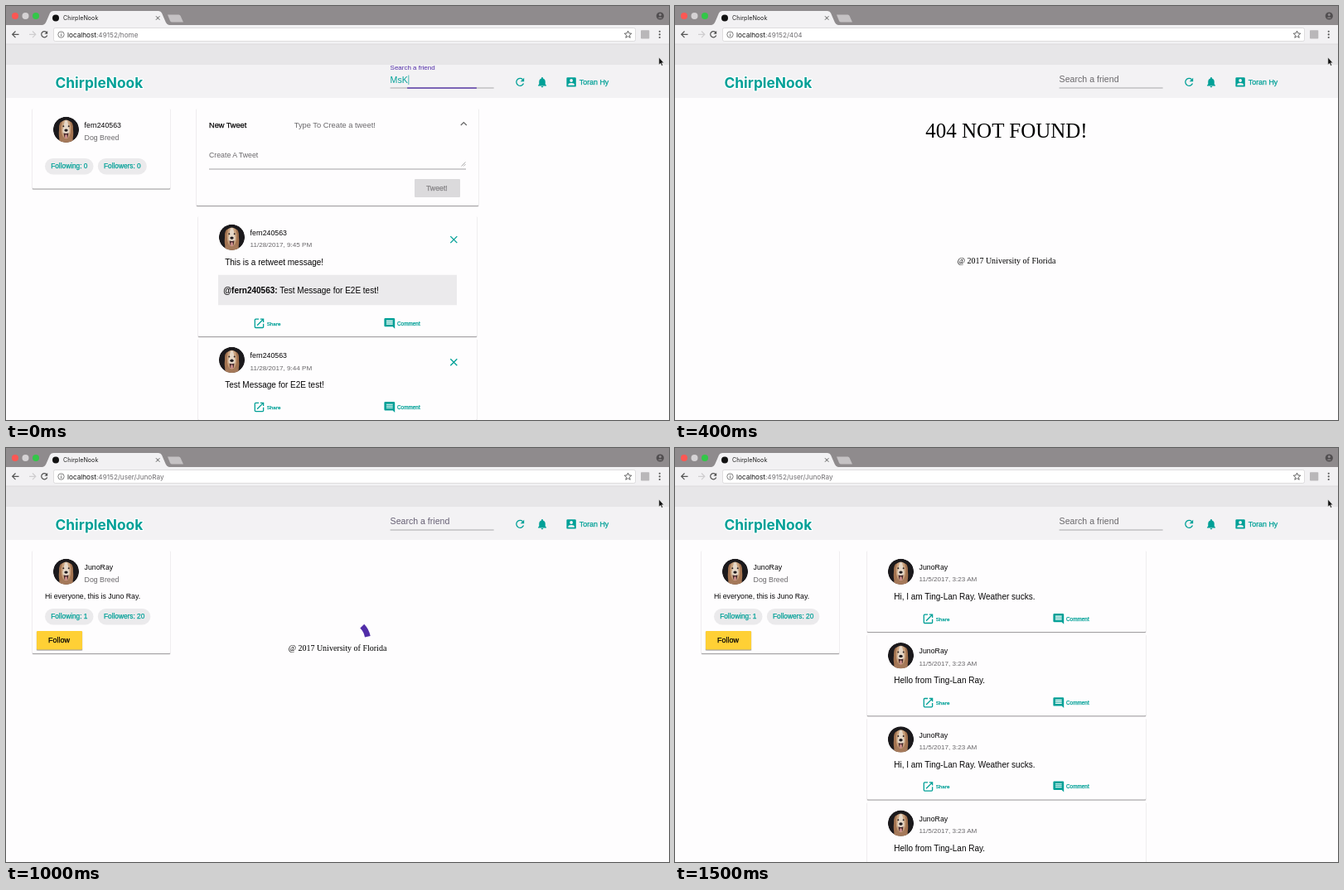
Animation of 800x500 px, one loop 1600 ms. Source, as an HTML page:

```html
<!DOCTYPE html>
<html lang="en">
<head>
<meta charset="utf-8">
<title>ChirpleNook</title>
<style>
html, body { margin: 0; width: 100%; height: 100%; overflow: hidden; background: #fefdfe; }
svg { display: block; width: 800px; height: 500px; }
text { font-family: "Liberation Sans", Arial, sans-serif; white-space: pre; }
.ui { font-family: Inter, Roboto, sans-serif; }
.serif { font-family: "Liberation Serif", Times, serif; }
.medium { stroke: currentColor; stroke-width: .25px; }
.line { fill: none; stroke-width: 1.3px; }
</style>
</head>
<body>
<svg viewBox="0 0 800 500" xmlns="http://www.w3.org/2000/svg">
  <defs>
    <clipPath id="face"><circle r="15.6"/></clipPath>
    <clipPath id="below"><rect y="71" width="800" height="429"/></clipPath>
    <g id="dog" clip-path="url(#face)">
      <circle r="15.6" fill="#1b191c"/>
      <path d="M-8 17Q-9 8 -6 4H6Q9 8 8 17Z" fill="#a5795a"/>
      <path d="M-4.500 -10Q-9 -9 -8.500 0Q-9.500 9 -7 12L-4 6ZM4.500 -10Q9 -9 8.500 0Q9.500 9 7 12L4 6Z" fill="#a37350"/>
      <path d="M-4.500 -10Q0 -13.500 4.500 -10Q6.500 -4 5.500 3Q4 11 0 11Q-4 11 -5.500 3Q-6.500 -4 -4.500 -10Z" fill="#c9a27e"/>
      <path d="M-1.500 -11H1.500L4 0Q4.500 6 0 7Q-4.500 6 -4 0Z" fill="#e6d8c8"/>
      <circle cx="-3.200" cy="-4" r="1" fill="#2b2324"/>
      <circle cx="3.200" cy="-4" r="1" fill="#2b2324"/>
      <ellipse cy=".8" rx="2.200" ry="1.700" fill="#211c1f"/>
      <path d="M-3 4Q0 5.500 3 4L2 9.500H-2Z" fill="#47292c"/>
      <ellipse cy="8.300" rx="1.500" ry="2.600" fill="#cc8d8b"/>
    </g>
    <g id="share" class="line" stroke="#00a097">
      <path d="M-.5 -5.1H-4.2Q-5.2 -5.1 -5.2 -4.1V4.2Q-5.2 5.2 -4.2 5.2H4.1Q5.1 5.2 5.1 4.2V.4M1.4 -5.1H5.1V-1.4M5 -5L-2.4 2.4"/>
    </g>
    <g id="comment">
      <path d="M-5.2 -6.3H5.2Q6.4 -6.3 6.4 -5.1V6.5L3.9 4H-5.2Q-6.4 4 -6.4 2.8V-5.1Q-6.4 -6.3 -5.2 -6.3Z" fill="#00a097"/>
      <path d="M-3.9 -3.2H3.9M-3.9 -1.2H3.9M-3.9 .8H3.9" stroke="#fff" stroke-width="1.1"/>
    </g>
  </defs>
  <rect width="800" height="500" fill="#fefdfe"/>
  <g id="page"></g>
  <g id="header"></g>
  <g id="chrome"></g>
  <g id="address"></g>
</svg>
<script>
const TEAL = '#00a097', PURPLE = '#512da8', INK = '#060506', GREY = '#6a686b';
const SITE = 'ChirpleNook', ME = 'fern240563', FRIEND = 'JunoRay';
const STEP = 100, LOOP = 1600;
const $ = id => document.getElementById(id);

const text = (x, y, size, str, fill = INK, extra = '') =>
  `<text x="${x}" y="${y}" font-size="${size}" fill="${fill}" ${extra}>${str}</text>`;
const medium = (x, y, size, str, fill) =>
  text(x, y, size, str, fill, `class="medium" color="${fill}"`);
const centered = (y, size, str) =>
  text(400, y, size, str, '#000', 'class="serif" text-anchor="middle"');
const rect = (x, y, w, h, fill, rx = 0) =>
  `<rect x="${x}" y="${y}" width="${w}" height="${h}" rx="${rx}" fill="${fill}"/>`;
// faint sides, a firm lower edge and no upper edge
const card = (x, y, w, h, fill = '#fefdfe') =>
  rect(x - .6, y + .5, w + 1.2, h + 1, '#e4e2e4', 1) +
  rect(x, y + h - 2, w, 3, '#a3a1a3', 1) + rect(x, y, w, h, fill, 1);
const circle = (x, y, r, fill) => `<circle cx="${x}" cy="${y}" r="${r}" fill="${fill}"/>`;
const stroke = (d, color, width = 1.2) =>
  `<path d="${d}" fill="none" stroke="${color}" stroke-width="${width}"/>`;
const use = (id, x, y) => `<use href="#${id}" x="${x}" y="${y}"/>`;
const mix = (a, b, k) => a + (b - a) * k;
const blend = (a, b, k) => `rgb(${a.map((v, i) => Math.round(mix(v, b[i], k)))})`;

function drawChrome() {
  return rect(0, 0, 800, 23, '#8f8b8d') +
    circle(11, 12, 4, '#fc5753') + circle(23.5, 12, 4, '#d5d2d4') + circle(36, 12, 4, '#33c748') +
    '<path d="M44 23Q47 22.5 48.5 19L53 8.5Q54 6 57 6H184Q187 6 188 8.5L192.500 19Q194 22.500 197 23Z" fill="#f2f1f3"/>' +
    circle(60, 14.5, 4, '#111') +
    text(69, 17.2, 7.2, SITE, '#222', 'class="ui"') +
    stroke('M181 12.3L185.400 16.700M185.400 12.300L181 16.700', '#555', 1) +
    '<path d="M195 10.500H208.500Q210 10.500 210.600 12L214 19.500H200.500Q198.700 19.500 198 18Z" fill="#c5c2c4"/>' +
    circle(789.3, 12, 4.6, '#514e50') + circle(789.3, 10.6, 1.5, '#8f8b8d') +
    '<path d="M786.300 14.800Q789.300 11.800 792.300 14.800Z" fill="#8f8b8d"/>' +
    rect(0, 23, 800, 23, '#f2f1f3') +
    '<rect x="57.500" y="26.500" width="702" height="16" rx="2" fill="#fff" stroke="#d3d1d3" stroke-width=".7"/>' +
    stroke('M15.500 34.300H8M11.500 30.500L7.700 34.300L11.500 38.100', '#555') +
    stroke('M28 34.300H35.500M32 30.500L35.800 34.300L32 38.100', '#cfcdcf') +
    stroke('M49.300 32.200A3.600 3.600 0 1 0 49.700 35.500', '#555') +
    '<path d="M50.200 30V33.700H46.500Z" fill="#555"/>' +
    '<circle cx="66.500" cy="34.500" r="3.700" fill="none" stroke="#666" stroke-width=".8"/>' +
    rect(66.1, 34, .9, 2.6, '#666') + rect(66.1, 32.3, .9, .9, '#666') +
    '<path d="M750.500 30L751.700 32.900L754.800 33.200L752.400 35.200L753.200 38.300L750.500 36.600L747.800 38.300L748.600 35.200L746.200 33.200L749.300 32.900Z" fill="none" stroke="#555" stroke-width=".9"/>' +
    rect(766, 29.3, 10.3, 10.3, '#b9b7b9', .8) +
    [30.8, 34.4, 38].map(y => circle(788.7, y, 1.05, '#555')).join('') +
    rect(0, 46, 800, 25, '#e7e6e8') + rect(0, 45.7, 800, .6, '#d0ced0') +
    '<path d="M787.800 62V71L789.800 69.200L791.200 72.200L792.600 71.500L791.300 68.700H793.800Z" fill="#111" stroke="#fff" stroke-width=".5"/>';
}

function drawAddress(path) {
  return text(74, 37.5, 8.2, `localhost<tspan fill="#6f6d70">:49152/${path}</tspan>`, '#111', 'class="ui"');
}

// down: 0 = label floats above the field, 1 = label rests in it
function drawHeader({ down = 1, typed = '', ripple = 0 }) {
  const size = mix(7.97, 10.625, down);
  const tone = Math.max(0, (down - .9) / .1);
  let out = rect(0, 71, 800, 40, '#f3f2f4') +
    text(59.5, 99.3, 17.3, SITE, TEAL,
      'class="ui" font-weight="700" stroke="#fff" stroke-width="2.500" stroke-linejoin="round" paint-order="stroke"') +
    '<g clip-path="url(#below)">' +
    text(463.6, mix(76.6, 92.4, down), size, 'Search a friend',
      blend([81, 45, 168], [106, 104, 107], tone)) + '</g>' +
    rect(463.6, 98.6, 125, .8, '#959396');
  if (typed) out += text(463.6, 92.8, 10.625, typed, TEAL, 'id="typed"');
  if (ripple) out += rect(526 - 62.5 * ripple, 98.4, 125 * ripple, 1.3, PURPLE);
  return out +
    stroke('M623.500 88.600A4.500 4.500 0 1 0 624.500 93.500', TEAL, 1.3) +
    `<path d="M625.200 86.800V91.300H620.700Z" fill="${TEAL}"/>` +
    `<path transform="translate(639.500 84.500) scale(.625)" fill="${TEAL}" d="M12 22c1.100 0 2-.9 2-2h-4c0 1.100.89 2 2 2zm6-6v-5c0-3.070-1.640-5.640-4.500-6.320V4c0-.83-.67-1.500-1.500-1.500s-1.500.67-1.500 1.500v.68C7.630 5.360 6 7.920 6 11v5l-2 2v1h16v-1l-2-2z"/>` +
    rect(676.4, 86.2, 11.4, 11.4, TEAL, 1.2) + circle(682.1, 90, 1.9, '#f3f2f4') +
    '<path d="M678.300 95.700V95.100Q678.300 93.100 682.100 93.100T685.900 95.100V95.700Z" fill="#f3f2f4"/>' +
    medium(691.8, 95.1, 8.9, 'Toran Hy', TEAL);
}

function profile(name, following, followers, bio) {
  const dy = bio ? 10 : 0;
  const chip = (x, w, str) => rect(x, 184 + dy, w, 19.4, '#ebeaec', 9.7) +
    medium(x + 7.2, 196.4 + dy, 8.3, str, TEAL);
  let out = card(32, 124, 166, bio ? 124 : 96.5) + use('dog', 72.5, 149.3) +
    text(94.6, 147, 8.75, name) + text(94.6, 161.8, 8.75, 'Dog Breed', GREY) +
    chip(47, 58.5, 'Following: ' + following) +
    chip(110.8, followers > 9 ? 63.5 : 59, 'Followers: ' + followers);
  if (bio) {
    out += text(47, 182, 8.75, bio) +
      card(37, 221, 55, 22.5, '#ffd035') + medium(51, 235.2, 9, 'Follow', INK);
  }
  return out;
}

// a: vertical centre of the avatar
function post(a, name, date, msg, { quote = '', own = false } = {}) {
  const dy = quote ? 47 : 0, foot = a + 57 + dy;
  let out = card(232, a - 25.3, 336, 98 + dy) + use('dog', 272.5, a) +
    text(294.6, a - 2.2, 8.75, name) + text(294.6, a + 12.1, 8.125, date, GREY) +
    text(264.2, a + 33.7, 10, msg);
  if (quote) {
    out += rect(256, a + 45.4, 288, 36.6, '#ebeaec') +
      text(262.3, a + 67.6, 10, `<tspan font-weight="700">@${name}:</tspan> ${quote}`);
  }
  if (own) out += stroke(`M536.300 ${a - 1.2}l8 8m0 -8l-8 8`, TEAL, 1.3);
  return out + use('share', 305.5, foot) + medium(314.7, foot + 2.2, 6.25, 'Share', TEAL) +
    use('comment', 462.8, foot) + medium(472, foot + 2.2, 6.4, 'Comment', TEAL);
}

function composer() {
  return card(230, 124, 340, 117) +
    medium(245, 147.4, 9.2, 'New Tweet', INK) +
    text(347.8, 147.4, 9.3, 'Type To Create a tweet!', GREY) +
    stroke('M548.800 144L552.300 140.500L555.800 144', '#666') +
    text(245, 182.8, 8.75, 'Create A Tweet', GREY) +
    stroke('M549.500 193.500L554.500 188.500M552 193.500L554.500 191', '#888', .7) +
    rect(245, 196.6, 310, .8, '#8b898c') +
    rect(493, 209, 55, 22, '#dbdadc', 1) + medium(507, 223.2, 8.75, 'Tweet!', '#858386');
}

function home() {
  const msg = 'Test Message for E2E test!';
  return profile(ME, 0, 0) + composer() +
    post(279.3, ME, '11/28/2017, 9:45 PM', 'This is a retweet message!', { quote: msg, own: true }) +
    post(427.4, ME, '11/28/2017, 9:44 PM', msg, { own: true });
}

function spinner(u) {
  const from = 46 * u * u, to = 28 + 51 * u;
  const at = deg => {
    const a = deg * Math.PI / 180;
    return `${411.8 + 25 * Math.sin(a)} ${232.5 - 25 * Math.cos(a)}`;
  };
  return stroke(`M${at(from)}A25 25 0 0 1 ${at(to)}`, PURPLE, 6.8);
}

const footer = y => centered(y, 10, '@ 2017 University of Florida');
const loading = u => spinner(u) + footer(245);
const missing = () => centered(159, 25, '404 NOT FOUND!') + footer(311.3);
const friend = () => profile(FRIEND, 1, 20, 'Hi everyone, this is Juno Ray.');
const posts = () => [0, 1, 2, 3].map(i => post(149.3 + 101.3 * i, FRIEND, '11/5/2017, 3:23 AM',
  i % 2 ? 'Hello from Ting-Lan Ray.' : 'Hi, I am Ting-Lan Ray. Weather sucks.')).join('');

// time since submitting -> how far the label has dropped
const drop = ms => {
  const k = Math.min(1, Math.max(0, ms / 280));
  return k * k * (3 - 2 * k);
};

function scene(t) {
  if (t < 100) return { path: 'home', page: home(), field: { down: 0, typed: 'MsK', ripple: .67 } };
  if (t < 300) return { path: 'user/MsKnoll', page: loading((t - 100) / 200 - .1), field: { down: drop(t - 100) } };
  if (t < 800) {
    const field = t < 600 ? { down: drop(t - 100) }
      : t < 700 ? { down: .4, ripple: .2 }
      : { down: 0, typed: 'JunoR', ripple: .8 };
    return { path: '404', page: missing(), field };
  }
  const path = 'user/' + FRIEND, field = { down: drop(t - 740) };
  if (t < 1100) return { path, page: (t < 1000 ? '' : friend()) + loading((t - 800) / 200), field };
  return { path, page: friend() + posts(), field };
}

let last = -1;
function render(now) {
  const t = Math.floor(now % LOOP / STEP) * STEP;
  if (t !== last) {
    last = t;
    const { path, page, field } = scene(t);
    $('page').innerHTML = page;
    $('header').innerHTML = drawHeader(field);
    $('address').innerHTML = drawAddress(path);
    if (field.typed) {
      const x = 464.3 + $('typed').getComputedTextLength();
      $('header').insertAdjacentHTML('beforeend', rect(x, 83.5, .7, 11.5, TEAL));
    }
  }
}

$('chrome').innerHTML = drawChrome();
const start = performance.now();
function tick() {
  render(performance.now() - start);
  requestAnimationFrame(tick);
}
tick();
</script>
</body>
</html>
```
